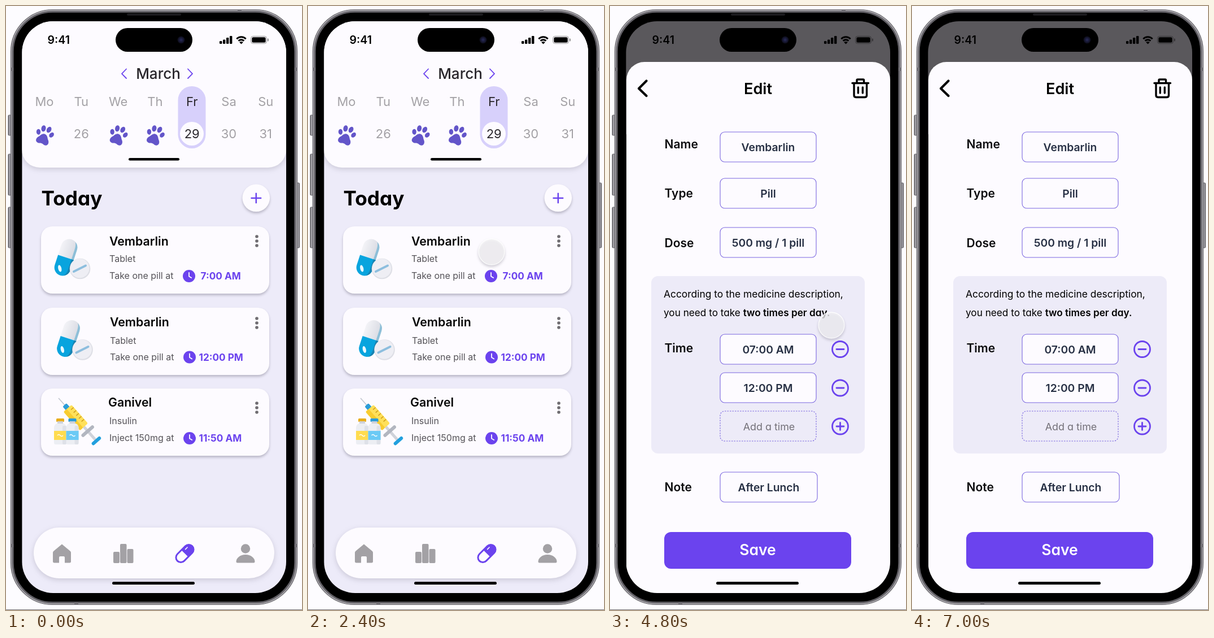
An HTML page that plays this animation: 524x1069 px, repeating every 7.1 s.

```html
<!DOCTYPE html>
<html lang="en">
<head>
<meta charset="utf-8">
<title>Medication reminder</title>
<style>
html, body { margin: 0; width: 100%; height: 100%; overflow: hidden; background: #fdfcff; }
svg { display: block; width: 100vw; height: 100vh; }
text { font-family: Inter, sans-serif; white-space: pre; }
.geo { font-feature-settings: "cv11"; }
.raised { filter: drop-shadow(0 3px 2px rgba(70, 65, 85, .3)); }
.soft { filter: drop-shadow(0 3px 5px rgba(70, 65, 85, .2)); }
</style>
</head>
<body>
<svg id="stage" viewBox="0 0 524 1069" preserveAspectRatio="none"></svg>
<script>
const LOOP = 7100, STEP = 100, OPEN_AT = 2500;
const PURPLE = '#6b43ee', WHITE = '#fdfbff', LILAC = '#edebf9', GREY = '#a3a1a5';
const MED = 'Vembarlin', INSULIN = 'Ganivel';

const rect = (x, y, w, h, r, fill, extra = '') =>
  `<rect x="${x}" y="${y}" width="${w}" height="${h}" rx="${r}" fill="${fill}" ${extra}/>`;
const circle = (x, y, r, fill, extra = '') =>
  `<circle cx="${x}" cy="${y}" r="${r}" fill="${fill}" ${extra}/>`;
const line = (d, color, width, extra = '') =>
  `<path d="${d}" fill="none" stroke="${color}" stroke-width="${width}" ${extra}/>`;
const text = (x, y, size, weight, fill, str, extra = '') =>
  `<text x="${x}" y="${y}" font-size="${size}" font-weight="${weight}" fill="${fill}" ${extra}>${str}</text>`;
const group = (transform, body) => `<g transform="${transform}">${body}</g>`;
const MID = 'text-anchor="middle"', GEO = 'class="geo"', ROUND = 'stroke-linecap="round" stroke-linejoin="round"';

const defs = `<defs>
  <clipPath id="screen">${rect(28.4, 27, 467.6, 1012, 55, '#fff')}</clipPath>
  <linearGradient id="metal" x1="0" x2="1" y1="0" y2="0">
    <stop offset="0" stop-color="#55545a"/><stop offset=".5" stop-color="#b4b2b8"/><stop offset="1" stop-color="#5b5a60"/>
  </linearGradient>
  <linearGradient id="shell" x1="0" x2="1" y1="0" y2="0">
    <stop offset="0" stop-color="#f3f3f7"/><stop offset="1" stop-color="#d8dae2"/>
  </linearGradient>
  <radialGradient id="lens"><stop offset="0" stop-color="#2a2c5c"/><stop offset="1" stop-color="#0b0b17"/></radialGradient>
</defs>`;

function phone() {
  const key = (x, y, h) => rect(x, y, 5, h, 1.5, 'url(#metal)', 'stroke="#4d4c51" stroke-width=".8"');
  const band = (x, y, w, h) => rect(x, y, w, h, 0, '#737177');
  return key(4, 193, 36) + key(4, 262, 73) + key(4, 356, 72) + key(514.5, 313, 115) +
    rect(8.5, 6.5, 507, 1053, 74, '#a9a7ac', 'stroke="#66646a" stroke-width="1.2"') +
    rect(12.2, 10.2, 499.6, 1045.6, 70.3, '#000', 'stroke="#626066" stroke-width="3"') +
    band(8, 109, 5, 6) + band(8, 952, 5, 6) + band(511, 109, 5, 6) + band(511, 952, 5, 6) +
    band(410, 6, 7, 4) + band(121, 1056, 7, 4) +
    rect(214, 13, 96, 4, 2, '#1c1b1e') +
    rect(0, 1068, 524, 1, 0, '#77757a');
}

const island = () => rect(194, 39, 136, 42, 21, '#000') + circle(310, 60, 6.5, 'url(#lens)');

function status(dx) {
  const bars = [5, 7.5, 11, 14].map((h, i) => rect(378 + i * 6, 67 - h, 4.4, h, 1.2, '#000')).join('');
  const wifi = line('M408.3 58.2A11.6 11.6 0 0 1 424.7 58.2M411.6 61.8A6.9 6.9 0 0 1 421.4 61.8', '#000', 2.9) +
    '<path d="M413.2 64.3A4.6 4.6 0 0 1 419.8 64.3L416.5 67.6Z"/>';
  const battery = rect(433.5, 53.5, 28, 13, 4, 'none', 'stroke="#000" stroke-opacity=".4"') +
    rect(435.3, 55.3, 24.4, 9.4, 2.5, '#000') + rect(463, 57.5, 1.8, 5, 1, '#000', 'opacity=".45"');
  return group(`translate(${dx} 0)`, text(73.6, 67, 19.5, 600, '#000', '9:41') + bars + wifi + battery);
}

const paw = x => group(`translate(${x} 229) rotate(20)`, `<g fill="#6355c9">
  <ellipse cx="-12" cy="-2.3" rx="3.7" ry="5" transform="rotate(-22 -12 -2.3)"/>
  <ellipse cx="-5.6" cy="-11" rx="4" ry="5.6" transform="rotate(-8 -5.6 -11)"/>
  <ellipse cx="4.2" cy="-12.2" rx="4" ry="5.6" transform="rotate(8 4.2 -12.2)"/>
  <ellipse cx="11.6" cy="-5" rx="3.7" ry="5" transform="rotate(22 11.6 -5)"/>
  <path d="M0 -2.5C5 -2.5 6.5 2.5 9 5.5C12.5 9 12.5 15.5 7 16C3.5 16.3 3 14.8 0 14.8S-3.5 16.3 -7 16C-12.5 15.5 -12.5 9 -9 5.5C-6.5 2.5 -5 -2.5 0 -2.5Z"/></g>`);

function calendar() {
  const days = ['Mo', 'Tu', 'We', 'Th', 'Fr', 'Sa', 'Su'];
  const cells = days.map((day, i) => {
    const x = 68 + i * 65.3, ink = i === 4 ? '#2a272c' : GREY;
    const mark = [0, 2, 3].includes(i) ? paw(x) : text(x, 234, 22, 400, ink, 25 + i, MID);
    return text(x, 177, 22, 400, ink, day, MID) + mark;
  }).join('');
  return `<path class="soft" d="M28 27H496V254A32 32 0 0 1 464 286H60A32 32 0 0 1 28 254Z" fill="${WHITE}"/>` +
    line('M213 111.5L205 119.8L213 128M322 111.5L330 119.8L322 128', PURPLE, 1.8, ROUND) +
    text(269.5, 128.5, 26, 500, '#2a272c', 'March', MID) +
    rect(304.5, 142, 49, 110, 24.5, '#d7d0fb') + circle(329, 226, 21, WHITE) + cells +
    rect(217, 269, 90, 4.6, 2.3, '#000');
}

function pills() {
  const capsule = `<path d="M-14 0V-18A14 14 0 0 1 14 -18V0Z" fill="url(#shell)"/>
    <path d="M-14 0V18A14 14 0 0 0 14 18V0Z" fill="#08a4de"/>
    <path d="M7 -30Q14 -26 14 -18V0H10V-18Q10 -26 7 -30Z" fill="#8dbfd8"/>
    <path d="M10 0H14V18Q14 27 6 31Q10 26 10 18Z" fill="#1883b2"/>
    <ellipse cx="-4" cy="21" rx="2.8" ry="6" transform="rotate(-32 -4 21)" fill="#e9f8ff"/>`;
  return group('translate(106 445) rotate(18) scale(1.04)', capsule) +
    circle(131, 465, 18.3, '#dddee5') + circle(130.5, 464.2, 17, '#eeeef4') +
    line('M120 470L141 459.5', '#8dbede', 4, ROUND);
}

function syringe() {
  const vial = (x, cap, label) => rect(x + 4, 730, 14, 6, 1.5, cap) + rect(x + 6, 735, 10, 5, 0, '#cfd2da') +
    `<path d="M${x + 5} 739H${x + 17}Q${x + 22} 741 ${x + 22} 747V773Q${x + 22} 776 ${x + 19} 776H${x + 3}Q${x} 776 ${x} 773V747Q${x} 741 ${x + 5} 739Z" fill="#eceef3"/>` +
    rect(x + 15, 743, 7, 33, 2, '#dee1e8') + rect(x, 752, 22, 16, 0, label) +
    line(`M${x + 6} 760q2.5 -3 5 0t5 0`, '#fff', 1.3);
  const ticks = [22, 29, 36, 43, 50].map(x => `M${x} -9V-3`).join('');
  const tool = line('M0 0H20', '#c5c9d2', 1.8) + rect(16, -4.5, 10, 9, 2, '#2a9cd8') +
    line('M65 0H100', '#cfd2da', 5) +
    rect(24, -9.5, 44, 19, 3, '#ffe05a') + rect(24, 2, 44, 7.5, 2, '#f8cc30') +
    group('translate(8 0)', line(ticks, '#cf9c1a', 1.6)) +
    rect(75, -14, 6, 28, 3, '#b2b6c0') + rect(98, -10, 6, 20, 3, '#22a0de');
  return group('translate(93 694) rotate(48.5)', tool) +
    vial(85, '#e9ae1c', '#ffdc50') + vial(106.5, '#2a9cd8', '#6bcaf5');
}

function card(y, nameX, x, name, kind, dose, time, timeX, clockX, rows) {
  const [nameY, kindY, doseY, timeY, clockY, dotY] = rows;
  const dots = [-8, 0, 8].map(k => circle(444, dotY + k, 2.8, '#706d72')).join('');
  return rect(62, y, 404, 119, 20, WHITE, 'class="raised"') + dots +
    text(nameX, nameY, 21.3, 600, '#050505', name) +
    text(x, kindY, 16, 400, '#555358', kind) +
    text(x, doseY, 16, 400, '#555358', dose) +
    circle(clockX, clockY, 11, PURPLE) +
    line(`M${clockX} ${clockY - 6}V${clockY + .5}L${clockX + 4.2} ${clockY + 3}`, '#fff', 1.8, ROUND) +
    text(timeX, timeY, 17.2, 700, PURPLE, time);
}

function nav() {
  const home = `<path d="M99 952.5L114 965Q115 966 115 967.5V983Q115 985.5 112.5 985.5H104V976Q104 974 102 974H96Q94 974 94 976V985.5H85.5Q83 985.5 83 983V967.5Q83 966 84 965Z" fill="${GREY}"/>`;
  const chart = rect(190, 966, 11, 20, 2, GREY) + rect(202, 952, 11.5, 34, 2, GREY) + rect(214.5, 961, 11, 25, 2, GREY);
  const pill = group('translate(316.5 969) rotate(45)',
    rect(-8.5, -18.5, 17, 37, 8.5, WHITE, `stroke="${PURPLE}" stroke-width="3"`) +
    `<path d="M-9 0V-10A9 9 0 0 1 9 -10V0Z" fill="${PURPLE}"/>` +
    line('M-4.5 -11V-6', '#fff', 1.6, ROUND));
  const person = circle(424, 960.5, 8.2, GREY) +
    `<path d="M407.5 983.5A16.5 12.5 0 0 1 440.5 983.5Q440.5 985.5 438.5 985.5H409.5Q407.5 985.5 407.5 983.5Z" fill="${GREY}"/>`;
  return rect(49, 923, 426, 90, 45, WHITE, 'class="soft"') + home + chart + pill + person;
}

const bottomBar = rect(188, 1019, 146, 5, 2.5, '#000');

function homeScreen() {
  return rect(28, 27, 468, 1012, 0, LILAC) + calendar() + status(0) +
    text(62.5, 352.5, 35.2, 700, '#000', 'Today', GEO) +
    circle(442.8, 339.8, 24.3, WHITE, 'class="raised"') + line('M433.5 340H452.2M442.8 330.7V349.3', PURPLE, 2.5) +
    card(390, 183, 183, MED, 'Tablet', 'Take one pill at', '7:00 AM', 344.5, 324, [423.5, 453, 482.5, 484, 478, 416]) +
    card(534, 184, 184, MED, 'Tablet', 'Take one pill at', '12:00 PM', 341.5, 325, [567, 597.5, 627, 627.5, 621.5, 561]) +
    card(677, 181, 183, INSULIN, 'Insulin', 'Inject 150mg at', '11:50 AM', 341.5, 325, [708.5, 739.5, 770, 771, 765, 711]) +
    pills() + group('translate(4.5 143.5)', pills()) + syringe() + nav() + bottomBar;
}

function editScreen() {
  const edge = 'stroke="#7a66df" stroke-width="1.1"';
  const field = (y, str, w = 170, h = 53) =>
    rect(195, y, w, h, 8, WHITE, edge) + text(195 + w / 2, y + 34, 19.3, 600, '#273044', str, MID);
  const label = (y, str) => text(96.5, y, 21, 600, '#0b0b0d', str);
  const ring = (y, plus) => circle(407.5, y, 14, 'none', `stroke="${PURPLE}" stroke-width="2.8"`) +
    line(`M401 ${y}H414` + (plus ? `M407.5 ${y - 6.5}V${y + 6.5}` : ''), PURPLE, 2.8, ROUND);
  const trash = line('M429 136.5H457.5M437 136V131.5Q437 130 438.5 130H448Q449.5 130 449.5 131.5V136M432 137V158Q432 161.5 435.5 161.5H451Q454.5 161.5 454.5 158V137M439.3 144V154M447.3 144V154', '#000', 3.4, ROUND);
  return rect(28, 27, 468, 200, 0, '#5a585c') + status(1) +
    `<path d="M29 1039V131A32 32 0 0 1 61 99H464A32 32 0 0 1 496 131V1039Z" fill="${WHITE}"/>` +
    line('M64.5 132.5L51 146L64.5 159', '#000', 4.2, ROUND) +
    text(262, 156, 27.2, 600, '#000', 'Edit', `${MID} ${GEO}`) + trash +
    label(252, 'Name') + field(223, MED) + label(339, 'Type') + field(305, 'Pill') +
    label(426.5, 'Dose') + field(392, '500 mg / 1 pill') +
    rect(73, 478, 378, 314, 12, '#edebf8') +
    text(95, 516, 17.4, 400, '#000', 'According to the medicine description,', GEO) +
    text(95, 549, 17.2, 400, '#000', 'you need to take <tspan font-weight="600">two times per day.</tspan>', GEO) +
    label(612.5, 'Time') + field(581, '07:00 AM') + field(649, '12:00 PM') +
    rect(195, 717, 170, 53, 8, 'none', edge + ' stroke-dasharray="2.5 2"') +
    text(281.5, 751, 17.9, 400, '#737078', 'Add a time', `${MID} ${GEO}`) +
    ring(607.5) + ring(676) + ring(744, true) +
    label(859, 'Note') + field(825, 'After Lunch', 172) +
    rect(96, 931, 331, 65, 12, PURPLE) + text(261.5, 972, 26.5, 600, '#fff', 'Save', `${MID} ${GEO}`) + bottomBar;
}

document.getElementById('stage').innerHTML = defs + rect(0, 0, 524, 1069, 0, '#fdfcff') + phone() +
  `<g clip-path="url(#screen)"><g id="home">${homeScreen()}</g><g id="edit">${editScreen()}</g></g>` + island() +
  `<g id="touch" class="raised">${circle(0, 0, 23, '#f6f5f7', 'fill-opacity=".72" stroke="#fff" stroke-opacity=".85" stroke-width="1.3"')}</g>`;

const [home, edit, touch] = ['home', 'edit', 'touch'].map(id => document.getElementById(id));

// time, x, y: enters lower right, taps the first card, then glides down to Save
const path = [
  [500, 560, 1040], [1000, 338, 502], [1300, 325, 435], [4300, 325, 435],
  [4800, 392, 565], [5250, 398, 690], [6200, 319, 929], [6500, 311, 959], [7000, 311, 959]
];

function slope(i, axis) {
  const a = path[i - 1], p = path[i], b = path[i + 1];
  if (!a || !b || a[axis] === p[axis] || b[axis] === p[axis]) return 0;
  return (b[axis] - a[axis]) / (b[0] - a[0]);
}

function glide(t, axis) {
  const i = path.findIndex((p, k) => k + 1 < path.length && t < path[k + 1][0]);
  const a = path[i], b = path[i + 1], span = b[0] - a[0], u = (t - a[0]) / span;
  const s = u * u * (3 - 2 * u), v = 1 - u;
  return a[axis] * (1 - s) + b[axis] * s + span * u * v * (v * slope(i, axis) - u * slope(i + 1, axis));
}

function draw(now) {
  const t = Math.floor((now % LOOP) / STEP) * STEP;
  const editing = t >= OPEN_AT, visible = t >= 500 && t < 7000;
  home.style.display = editing ? 'none' : '';
  edit.style.display = editing ? '' : 'none';
  touch.style.display = visible ? '' : 'none';
  if (visible) touch.setAttribute('transform', `translate(${glide(t, 1).toFixed(2)} ${glide(t, 2).toFixed(2)})`);
}

const start = performance.now();
function tick() {
  draw(performance.now() - start);
  requestAnimationFrame(tick);
}
tick();
</script>
</body>
</html>
```
